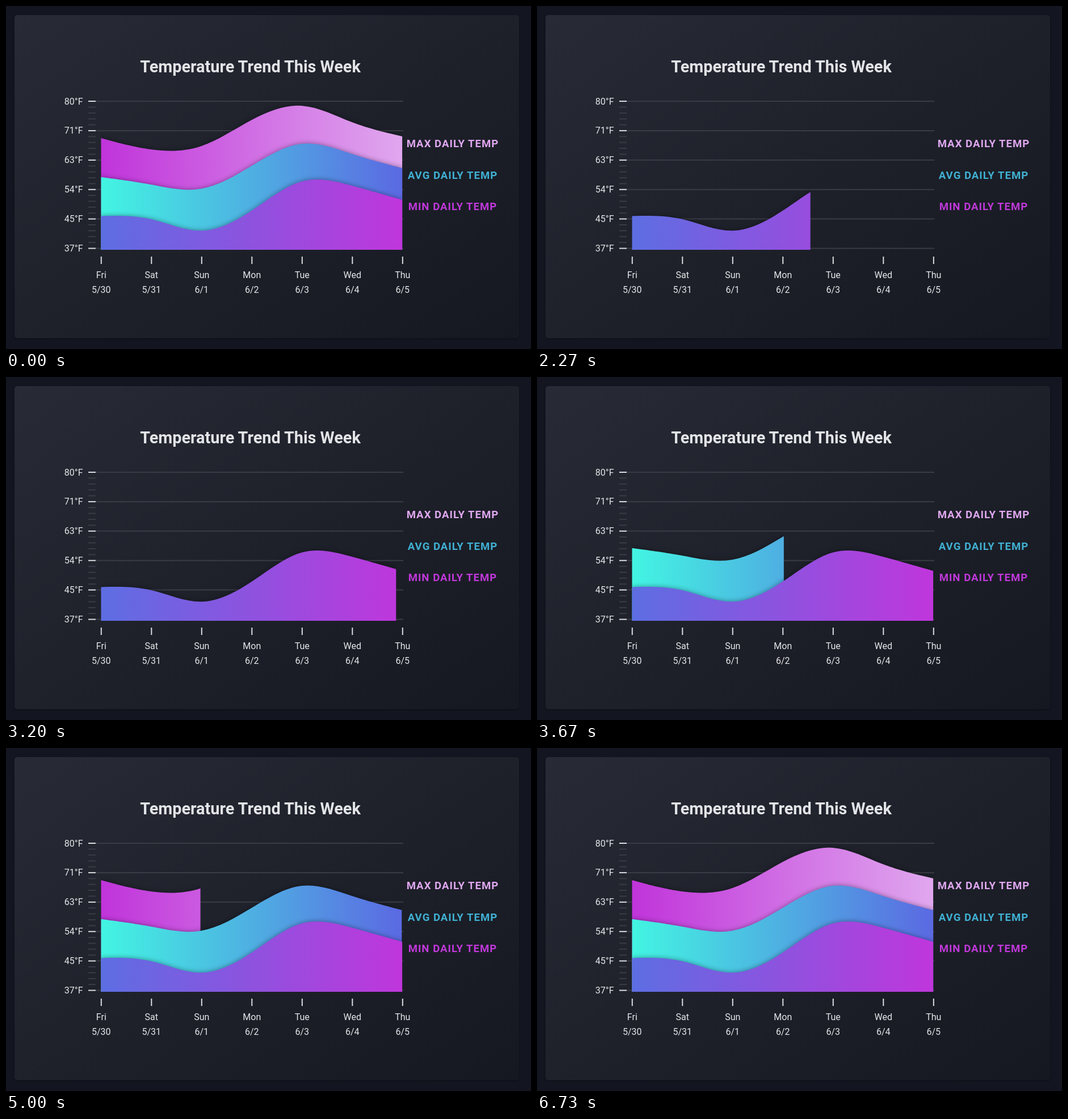
Write an HTML page that moves like this. It is 925x605 px and loops after 7.4 s.

```html
<!DOCTYPE html>
<html lang="en">
<head>
<meta charset="utf-8">
<title>Temperature Trend This Week</title>
<style>
  html, body { margin: 0; width: 100%; height: 100%; overflow: hidden; background: #131520; }
  .card {
    position: absolute; left: 15px; top: 16px; width: 889px; height: 570px;
    border-radius: 5px; background: linear-gradient(145deg, #282a35, #1f222b 45%, #161821);
    box-shadow: 0 1px 3px rgba(0, 0, 0, .4);
  }
  svg { position: absolute; left: 0; top: 0; display: block; }
  text { font: 16px Roboto, sans-serif; fill: #e6e7ea; text-anchor: middle; }
  .title { font-size: 28.8px; font-weight: 700; fill: #e3e4e7; }
  .value { text-anchor: end; }
  .legend { font-size: 18.6px; font-weight: 700; letter-spacing: 1px; }
  line { stroke: #393b45; stroke-width: 2; }
  .tick { stroke: #dcdde1; }
  .area { filter: drop-shadow(0 0 4px rgba(0, 0, 0, .4)); }
</style>
</head>
<body>
<div class="card"></div>
<svg id="chart" width="925" height="605" viewBox="0 0 925 605"></svg>
<script>
const LOOP = 7400, CLEAR = 1130, REVEAL = 2000;
const LEFT = 167.3, WIDTH = 531, BOTTOM = 430, DAY = WIDTH / 6;
const TOP = 168, ROW = 51.9;

// Back to front; points are the control heights of a B-spline, one per day.
const series = [
  { name: 'MAX', start: 4750, color: '#e0a8f0', from: '#c034da', to: '#e0a7ee', labelY: 248.5,
    points: [233, 257, 257, 196.6, 162.5, 209.4, 230] },
  { name: 'AVG', start: 3250, color: '#40b1d3', from: '#42f5e2', to: '#5b69e2', labelY: 304.5,
    points: [301.7, 313.4, 334.6, 282.3, 228.2, 263, 286] },
  { name: 'MIN', start: 1750, color: '#c038da', from: '#5d6ee2', to: '#c036dc', labelY: 360.3,
    points: [370.4, 368.7, 411, 365.3, 293.8, 316.6, 342] }
];
const days = ['Fri 5/30', 'Sat 5/31', 'Sun 6/1', 'Mon 6/2', 'Tue 6/3', 'Wed 6/4', 'Thu 6/5'];
const temps = [80, 71, 63, 54, 45, 37];

const line = (x1, y1, x2, y2, cls = '') =>
  `<line class="${cls}" x1="${x1}" y1="${y1}" x2="${x2}" y2="${y2}"/>`;
const text = (x, y, content, cls = '', style = '') =>
  `<text class="${cls}" style="${style}" x="${x}" y="${y}">${content}</text>`;

function areaPath(heights) {
  const p = heights.map((y, i) => [LEFT + i * DAY, y]);
  const last = p[p.length - 1];
  const mix = (...terms) => {
    const total = terms.reduce((sum, [w]) => sum + w, 0);
    return [0, 1].map(k => (terms.reduce((sum, [w, q]) => sum + w * q[k], 0) / total).toFixed(2));
  };
  let d = `M${p[0]}L${mix([5, p[0]], [1, p[1]])}`;
  for (let i = 1; i < p.length; i++) {
    const a = p[i - 1], b = p[i], c = p[i + 1] || last;
    d += `C${mix([2, a], [1, b])} ${mix([1, a], [2, b])} ${mix([1, a], [4, b], [1, c])}`;
  }
  return `${d}L${last}V${BOTTOM}H${LEFT}Z`;
}

function axes() {
  let out = '';
  temps.forEach((temp, i) => {
    const y = TOP + i * ROW;
    out += line(158, y, 700, y) + line(145, y, 158, y, 'tick');
    out += text(135.5, y + 5.5, temp + '°F', 'value');
    for (let k = 1; k < 5 && i < temps.length - 1; k++) {
      out += line(145, y + k * ROW / 5, 158, y + k * ROW / 5);
    }
  });
  days.forEach((day, i) => {
    const x = 167.8 + i * DAY, [name, date] = day.split(' ');
    out += line(x, 442, x, 455, 'tick') + text(x, 479.5, name) + text(x, 506, date);
  });
  return out;
}

const area = ({ name, from, to, points }) => `
  <linearGradient id="fill${name}">
    <stop stop-color="${from}"/><stop offset="1" stop-color="${to}"/>
  </linearGradient>
  <clipPath id="clip${name}">
    <rect id="wipe${name}" x="${LEFT}" y="0" width="0" height="${BOTTOM}"/>
  </clipPath>
  <g clip-path="url(#clip${name})">
    <path class="area" fill="url(#fill${name})" d="${areaPath(points)}"/>
  </g>`;

document.getElementById('chart').innerHTML =
  text(430.5, 117, 'Temperature Trend This Week', 'title') + axes() +
  series.map(area).join('') +
  series.map(s => text(787, s.labelY, s.name + ' DAILY TEMP', 'legend', 'fill:' + s.color)).join('');

const wipes = series.map(s => document.getElementById('wipe' + s.name));
const easeOut = u => 1 - (1 - u) ** 3;

function draw(now) {
  // The motion advances in steps of 1/15 s.
  const elapsed = now % LOOP;
  const t = Math.floor((elapsed + 4) * 0.015) / 0.015;
  series.forEach(({ start }, i) => {
    const u = elapsed < CLEAR ? 1 : Math.min(1, Math.max(0, (t - start) / REVEAL));
    wipes[i].setAttribute('width', WIDTH * easeOut(u));
  });
}

const began = performance.now();
function tick() {
  draw(performance.now() - began);
  requestAnimationFrame(tick);
}
tick();
</script>
</body>
</html>
```
